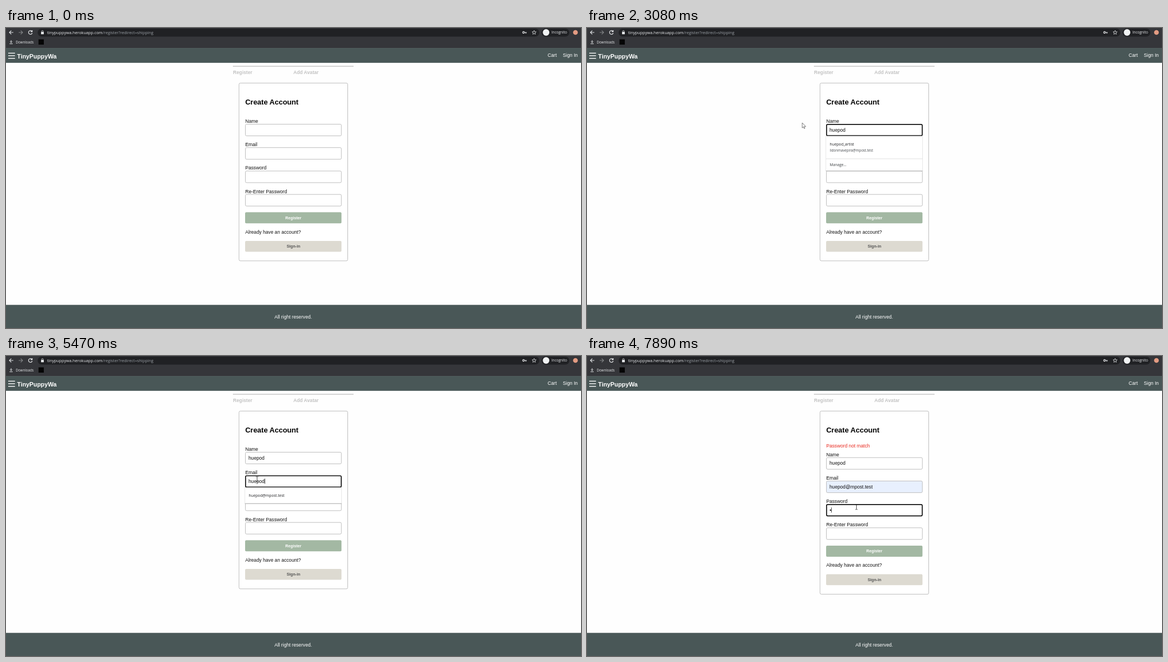
These frames come from a looping animation (1034x541 px, 8000 ms). An HTML page:

```html
<!DOCTYPE html>
<html lang="en">
<head>
<meta charset="utf-8">
<title>Create Account</title>
<style>
  html, body { margin: 0; width: 100%; height: 100%; overflow: hidden; background: #fefefe; }
  svg { display: block; width: 100%; height: 100%; }
  text { font-family: "Liberation Sans", Arial, sans-serif; font-size: 8.67px; fill: #111; white-space: pre; }
  .ui { font-family: "Open Sans", "Noto Sans", sans-serif; }
  .b { font-weight: bold; }
</style>
</head>
<body>
<svg viewBox="0 0 1034 541"><g id="chrome"></g><g id="page"></g></svg>
<script>
const LOOP = 8000;
const NAME = 'huepod', MAIL = NAME + '@mpost.test', OWNER = 'lidonmavepira@mpost.test';
const NAME_KEYS = [1460, 1690, 1840, 2070, 2150, 2230];
const MAIL_KEYS = [4390, 4620, 5000, 5170, 5320, 5470];
const SUGGESTIONS = [MAIL, 'huepla@mpost.test', 'huddle@mpost.test', 'harlo@mpost.test'];
const ERROR_AT = 7890, ERROR_SHIFT = 9.7;
const FIELD_Y = [173, 215.2, 257.4, 299.6];
const LABELS = ['Name', 'Email', 'Password', 'Re-Enter Password'];

// Pointer moves: start, end, steps, from x, y, to x, y
const MOVES = [
  [70, 370, 6, 719, 385, 488, 191],
  [830, 1060, 4, 487.5, 191, 478, 187.5],
  [2760, 3072, 5, 468, 185, 387, 171],
  [3150, 3540, 6, 392, 173, 451.5, 222],
  [6710, 6940, 4, 454, 228, 487, 270],
  [7110, 7260, 3, 487, 271, 484.5, 272.5]
];

const rect = (x, y, w, h, fill, extra = '') =>
  `<rect x="${x}" y="${y}" width="${w}" height="${h}" fill="${fill}" ${extra}/>`;
const text = (x, y, str, extra = '', style = '') =>
  `<text x="${x}" y="${y}" ${extra} style="${style}">${str}</text>`;
const path = (d, stroke, width = 1, extra = '') =>
  `<path d="${d}" fill="none" stroke="${stroke}" stroke-width="${width}" ${extra}/>`;
const circle = (x, y, r, fill) => `<circle cx="${x}" cy="${y}" r="${r}" fill="${fill}"/>`;
const ui = (x, y, str, size, fill, style = '') =>
  text(x, y, str, 'class="ui"', `font-size:${size}px;fill:${fill};${style}`);

function drawChrome() {
  const icon = '#e4e6e8';
  let star = '';
  for (let i = 0; i < 10; i++) {
    const r = i % 2 ? 1.7 : 3.9, a = i * Math.PI / 5;
    star += `${i ? 'L' : 'M'}${949.7 + r * Math.sin(a)} ${8.2 - r * Math.cos(a)}`;
  }
  return rect(0, 0, 1034, 37, '#35363a') +
    rect(57, 1, 902, 14.5, '#202124', 'rx="7.2"') +
    rect(963, 1, 50, 14.5, '#202124', 'rx="7.2"') +
    path('M13.2 8H6.2M9.5 4.6L6.1 8l3.4 3.4', icon, 1.2) +
    path('M22.8 8h7M26.5 4.6L29.9 8l-3.4 3.4', '#85878a', 1.1) +
    path('M46.5 5.8A3.4 3.4 0 1 0 47.2 9', icon, 1.2) +
    path('M47.4 4v3h-3z', icon, .6, `style="fill:${icon}"`) +
    rect(63, 7, 5, 4.2, icon, 'rx=".5"') +
    path('M64.1 7V5.9a1.4 1.4 0 0 1 2.8 0V7', icon, .8) +
    ui(74, 10.7, 'tinypuppywa.herokuapp.com<tspan fill="#9aa0a6">/register?redirect=shipping</tspan>', 7.32, '#e8eaed') +
    `<circle cx="930.7" cy="8" r="1.6" fill="none" stroke="${icon}" stroke-width="1.2"/>` +
    path('M932.3 8h4M934.9 8v2', icon, 1.2) +
    path(star + 'Z', icon, .8) +
    circle(971.2, 8, 5.9, '#f1f3f4') +
    ui(981, 10.4, 'Incognito', 6.4, '#e8eaed') +
    circle(1024, 8, 4.3, '#e39b82') +
    path('M9.2 22v4.2M7.3 24.4l1.9 2 1.9-2M6.4 28.4h5.6', icon, 1) +
    ui(17.5, 27.6, 'Downloads', 6.2, '#e8eaed') +
    rect(58.5, 20.5, 9.5, 9.5, '#050505') +
    rect(0, 36.5, 1034, 26.3, '#495757') + rect(0, 36, 1034, .8, '#566262') +
    [45.4, 50, 54.7].map(y => rect(4, y - .7, 12.2, 1.4, '#fff')).join('') +
    text(20, 55.4, 'TinyPuppyWa', 'class="b"', 'font-size:10.83px;fill:#fff') +
    text(974, 52, 'Cart', '', 'fill:#fff') + text(1001.2, 52, 'Sign In', '', 'fill:#fff') +
    rect(408, 68.4, 217, 1.2, '#b9b9b9') +
    text(408.3, 82.8, 'Register', 'class="b"', 'fill:#c3c3c3') +
    text(516.7, 82.8, 'Add Avatar', 'class="b"', 'fill:#c3c3c3') +
    rect(0, 499.3, 1034, 42, '#495757') +
    text(516.5, 523.6, 'All right reserved.', 'text-anchor="middle"', 'fill:#fff');
}

function field(i, value, focused, filled) {
  const y = FIELD_Y[i], fill = filled ? '#e8f0fe' : '#fff';
  const box = focused
    ? rect(430.8, y + .8, 172, 20.4, fill, 'rx="2" stroke="#101010" stroke-width="1.7"')
    : rect(430.5, y + .5, 172.6, 21, fill, 'rx="2.2" stroke="#bdbdbd" stroke-width="1"');
  return text(430.2, y - 2, LABELS[i]) + box + text(436, y + 13.7, value);
}

const caret = (x, y) => rect(x, y + 6, .8, 9.3, '#111');

function panel(y, height) {
  return rect(429.6, y, 174, height, '#fff', 'stroke="#e3e3e3" stroke-width=".8"') +
    rect(429.6, y + height - .5, 174, 1.1, '#b4b4b4');
}

// Panel with a ruled-off link at the bottom
const managed = (y, ruleAt, link) => panel(y, ruleAt + 22.3) +
  rect(430, y + ruleAt, 173.4, .8, '#d9d9d9') + ui(436.6, y + ruleAt + 13.4, link, 6.6, '#3c4043');

function nameMenu(all) {
  const y = 195, entries = [[NAME + '_artist', OWNER], ['Lidon Mave', OWNER], ['Lidon']];
  return managed(y, all ? 91.5 : 40.5, 'Manage...') +
    (all ? entries : entries.slice(0, 1)).map(([title, sub], i) =>
      ui(436.6, y + 17 + i * 31.4, title, 6.75, '#202124', 'font-weight:500') +
      (sub ? ui(436.6, y + 28.3 + i * 31.4, sub, 6.2, '#45484c') : '')).join('');
}

function passwordMenu(y) {
  return managed(y, 40.6, 'Manage passwords...') +
    rect(436.6, y + 16, 8.8, 8.8, '#4ba9c9') +
    ui(451.6, y + 17.2, OWNER, 6.75, '#3c4043') +
    [453.2, 456, 458.8].map(x => circle(x, y + 26.8, .95, '#202124')).join('');
}

function mailMenu(prefix, highlighted) {
  const y = 237.2, items = SUGGESTIONS.filter(s => s.startsWith(prefix));
  return panel(y, 9.4 + 19.5 * items.length) +
    (highlighted ? rect(430, y + 5, 173.2, 19.4, '#ececec') : '') +
    items.map((s, i) => ui(436.6, y + 17.2 + i * 19.5, s, 6.75, '#202124')).join('');
}

function pointer(t) {
  if (t < MOVES[0][0]) return '';
  const [start, end, steps, x0, y0, x1, y1] = MOVES.filter(m => t >= m[0]).pop();
  const k = Math.min(1, Math.floor((t - start) / (end - start) * (steps - 1) + 1e-6) / (steps - 1));
  const p = k * (2 - k), x = x0 + (x1 - x0) * p, y = y0 + (y1 - y0) * p;
  const overField = x > 430 && x < 604 && FIELD_Y.some(f => y > f && y < f + 22);
  return `<g transform="translate(${x} ${y})">` + (overField
    ? path('M-2 -4.3h1.5L0 -3.8 .5 -4.3H2M0 -3.8V3.8M-2 4.3h1.5L0 3.8 .5 4.3H2', '#222', .8)
    : path('M0 0V9.2l2.1-2 1.4 3.2 1.4-.6-1.4-3.1h2.9z', '#222', .6, 'style="fill:#fff"')) + '</g>';
}

function drawPage(t) {
  const within = (a, b) => t >= a && t < b;
  const typed = keys => keys.filter(k => t >= k).length;
  const nameLen = typed(NAME_KEYS), mailLen = typed(MAIL_KEYS);
  const filled = t >= 5950, failed = t >= ERROR_AT;
  const name = NAME.slice(0, nameLen), mail = filled ? MAIL : NAME.slice(0, mailLen);
  const focus = within(680, 3150) ? 0 : within(3620, 7340) ? 1 : t >= 7340 ? 2 : -1;
  const blinkOff = within(1230, 1460) || within(2760, 3150) || within(4160, 4390) || within(6860, 7340);
  const shift = failed ? ERROR_SHIFT : 0;

  let form = [name, mail, '', ''].map((v, i) => field(i, v, focus === i, i === 1 && filled)).join('');
  if (within(6330, 7340)) form += rect(436, 230, 28.8, .6, '#8d6f78');
  if (failed) form += circle(437.8, 268.2, 1.2, '#111');
  if (focus >= 0 && !blinkOff) {
    const end = [nameLen * 4.82, filled ? 77.7 : mailLen * 4.82, failed ? 3.1 : 0][focus];
    form += caret(436.2 + end, FIELD_Y[focus]);
  }
  form += rect(430, 332.2, 173.3, 20, '#a3b8a3', 'rx="2"') +
    text(516.7, 344.8, 'Register', 'class="b" text-anchor="middle"', 'font-size:7.22px;fill:#fff') +
    text(430.2, 370.6, 'Already have an account?') +
    rect(430, 383.9, 173.3, 19.6, '#dddad1', 'rx="2"') +
    text(516.9, 396.2, 'Sign-in', 'class="b" text-anchor="middle"', 'font-size:7.22px;fill:#555');

  let menu = '';
  if (within(770, 3150)) menu = nameMenu(!nameLen);
  else if (within(3700, 4390)) menu = passwordMenu(237.2);
  else if (within(4470, 6330)) menu = mailMenu(NAME.slice(0, mailLen), filled);
  else if (within(7420, ERROR_AT)) menu = passwordMenu(279.4);

  return rect(419, 99.3, 195.5, 320.6 + shift, '#fff', 'rx="2.5" stroke="#bdbdbd" stroke-width="1"') +
    text(430.2, 138.4, 'Create Account', 'class="b"', 'font-size:13px;fill:#000') +
    (failed ? text(430.2, 165.4, 'Password not match', '', 'fill:#e8281e') : '') +
    `<g transform="translate(0 ${shift})">${form}</g>` + menu + pointer(t);
}

const page = document.getElementById('page');
document.getElementById('chrome').innerHTML = drawChrome();
const began = performance.now();
let shown = '';

function tick() {
  const markup = drawPage((performance.now() - began) % LOOP);
  if (markup !== shown) page.innerHTML = shown = markup;
  requestAnimationFrame(tick);
}
tick();
</script>
</body>
</html>
```
